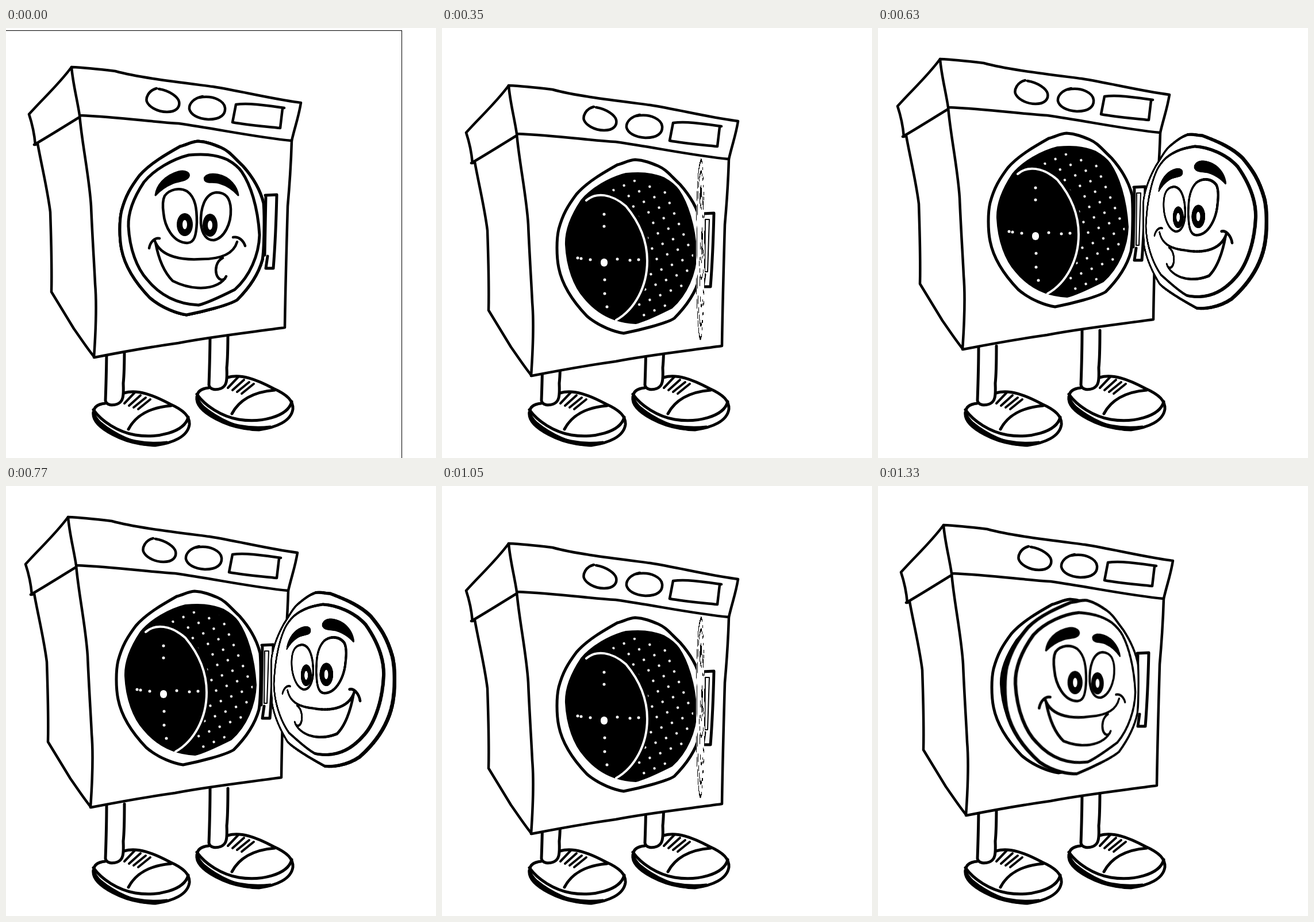
An HTML page without scripts that plays this animation: 748 by 748 pixels, repeating every 1.4 s.

```html
<!DOCTYPE html>
<html lang="en">
<head>
<meta charset="utf-8">
<title>Washing machine</title>
<style>
html, body { margin: 0; width: 100%; height: 100%; overflow: hidden; background: #fff; }
#stage { position: relative; width: 748px; height: 748px; overflow: hidden; animation: swing 1.4s step-end infinite, depth 1.4s step-end infinite; }
#stage svg { position: absolute; left: 0; top: 0; overflow: visible; fill: none; stroke: #000; stroke-width: 5; stroke-linecap: round; stroke-linejoin: round; }
#machine { position: absolute; inset: 0; transform: translate(var(--x), var(--y)); }
#machine svg.door {
  left: 190px; top: 190px; width: 270px; height: 320px; transform-origin: 133px 159px;
  transform: translateX(var(--c)) perspective(350px) rotateY(var(--r));
}
#machine svg.back { transform: translateX(var(--c)) perspective(350px) rotateY(var(--r)) translateZ(var(--z)); }
.hinge { opacity: var(--hinge); stroke-width: 2; }
.border { stroke-width: 1; stroke-linecap: butt; animation: side 1.4s step-end infinite; }
.border.top { animation-name: top; }
.white { fill: #fff; }
.black { fill: #000; }

/* x, y: cabinet shift; c, r: door centre and angle. The second half mirrors the first. */
@keyframes swing {
  0%, to   { --x: 0px;  --y: 0px;   --c: 0px;   --r: 0deg; }
  5%, 95%  { --x: 0px;  --y: 0px;   --c: 31px;  --r: 25deg; }
  10%, 90% { --x: 0px;  --y: 24px;  --c: 68px;  --r: 50deg; }
  15%, 85% { --x: 2px;  --y: 2px;   --c: 87px;  --r: 63deg; }
  20%, 80% { --x: 2px;  --y: 18px;  --c: 108px; --r: 76deg; }
  25%, 75% { --x: 2px;  --y: 32px;  --c: 127px; --r: 87deg; }
  30%, 70% { --x: 2px;  --y: 14px;  --c: 145px; --r: 95deg; }
  35%, 65% { --x: 2px;  --y: -6px;  --c: 162px; --r: 102deg; }
  40%, 60% { --x: -2px; --y: -9px;  --c: 197px; --r: 123deg; }
  45%, 55% { --x: -6px; --y: -14px; --c: 230px; --r: 145deg; }
  50%      { --x: 2px;  --y: -8px;  --c: 273px; --r: 168deg; }
}
@keyframes depth {
  0%, to { --z: 0px; --hinge: 0; }
  5%  { --z: -8px; --hinge: 0; }
  10% { --z: -8px; --hinge: 1; }
  25% { --z: 0px; --hinge: 1; }
  80% { --z: -8px; --hinge: 1; }
  95% { --z: -8px; --hinge: 0; }
}
@keyframes side { 0% { opacity: 1; } 15%, to { opacity: 0; } }
@keyframes top { 0% { opacity: 1; } 5%, to { opacity: 0; } }
</style>
</head>
<body>
<div id="stage">
  <svg width="748" height="748">
    <defs>
      <path id="rim" d="M303 206C315 203 322 198 334 197C350 198 362 203 374 208C388 214 395 224 412 240C428 258 442 280 448 305C450 330 449 385 446 403C440 425 425 450 402 473C388 482 340 494 314 499C300 497 272 488 250 469C226 444 207 415 201 385C197 365 197 335 201 318C208 292 217 277 232 257C250 236 280 219 303 206Z"/>
      <path id="inner" d="M385 229C362 219 340 219 318 221C290 228 258 246 240 268C224 292 212 318 213 345C215 385 228 418 245 437C262 458 290 480 335 482C352 478 376 466 398 455C424 432 440 395 441 360C438 310 425 272 410 250C403 240 394 234 385 229Z"/>
      <pattern id="holes" width="20" height="20" patternUnits="userSpaceOnUse" patternTransform="rotate(-24)">
        <circle cx="9" cy="9" r="2.2" fill="#fff" stroke="none"/>
      </pattern>
      <g id="foot">
        <path class="white" d="M205 635C228 628 255 638 285 654C310 665 320 676 319 690C316 711 290 722 260 726C225 726 187 706 164 687C150 674 146 656 172 653Z"/>
        <path class="black" d="M151 668C162 690 190 711 225 718C245 722 262 722 280 720C255 732 215 724 185 708C162 696 149 682 151 668Z" stroke-width="3"/>
        <path d="M152 664C166 684 195 703 225 708C262 714 310 704 317 677M213 698C225 675 250 660 287 657"/>
        <path d="M206 653L224 634M214 657L234 639M222 660L243 643M230 663L251 646" stroke-width="4"/>
        <path class="white" d="M175 553C175 590 174 620 173 648C175 657 186 657 194 654C204 650 205 640 204 618C206 600 206 580 206 553"/>
      </g>
    </defs>
    <use href="#foot"/>
    <use href="#foot" x="180" y="-27"/>
  </svg>

  <div id="machine">
    <svg width="748" height="748">
      <path class="border top" d="M0 4.5H689"/>
      <path class="border" d="M688.5 4V790"/>
      <g stroke-width="4.5">
        <path class="white" d="M114 68C140 69 165 72 190 75C230 86 290 93 360 102C410 110 460 123 513 130C509 155 503 170 497 196C496 230 494 265 490 310C488 380 486 450 485 521C420 530 350 538 300 548C250 555 200 564 154 573C141 557 130 540 118 523L79 459C80 420 79 380 77 320C72 280 62 240 55 201L51 203C49 180 45 165 40 150C65 122 92 98 114 68Z"/>
        <path d="M114 68C116 95 124 125 128 152C132 200 145 260 148 310C150 360 154 420 155 445C158 480 156 530 153 573M128 152C200 155 250 163 300 166C370 176 440 191 497 196M49 203C75 188 100 172 128 155"/>
        <path d="M262 105C247 109 243 122 245 128C248 136 262 146 280 146C296 146 303 138 301 128C299 120 285 109 266 106M342 119C326 122 318 132 319 141C321 150 333 158 352 159C374 159 382 150 381 139C380 128 362 116 336 121M484 139C455 135 425 130 400 133L394 164C420 169 450 171 477 174L481 140"/>
      </g>
      <path d="M451 291L471 290C470 335 468 380 465 418L452 418L455 397M452 292L450 395"/>
      <path class="hinge" d="M456 301H463L460 392H455Z"/>
      <use href="#rim" class="white"/>
      <use href="#inner" class="black" stroke-width="2"/>
      <path fill="url(#holes)" stroke="none" d="M290 248C325 225 370 225 395 252C430 300 440 340 433 385C420 430 385 465 340 474L326 464C375 410 375 310 308 260Z"/>
      <g stroke="#fff">
        <path d="M249 268C266 253 293 256 318 278C343 308 355 338 355 373C355 418 333 458 301 476" stroke-width="4"/>
        <path d="M280 292V292M280 313V313M281 406V406M281 430V430M285 453V453M234 368V368M240 369V369M256 371V371M303 370V370M325 372V372M340 371V371"/>
        <path d="M280 375V377" stroke-width="12"/>
      </g>
    </svg>

    <svg class="door back" viewBox="190 190 270 320"><use href="#rim" fill="#444"/></svg>

    <svg class="door" viewBox="190 190 270 320">
      <use href="#rim" class="white"/>
      <use href="#inner"/>
      <g class="black" stroke-width="3">
        <path d="M260 291C262 275 275 257 300 250C312 247 320 252 318 258C315 266 300 266 290 270C278 275 268 282 260 291Z"/>
        <path d="M404 291C402 277 390 259 368 255C352 252 343 258 346 265C349 270 362 267 372 270C386 274 396 282 404 291Z"/>
      </g>
      <path d="M276 292C285 280 302 277 315 284C330 295 332 315 332 338C331 360 328 374 315 374C290 373 276 345 274 322C272 308 273 298 276 292ZM366 286C345 288 338 315 339 340C341 360 350 370 362 369C380 365 392 340 391 315C390 295 382 286 366 286Z" stroke-width="4.5"/>
      <g stroke="none">
        <ellipse class="black" cx="311" cy="342" rx="14" ry="20"/>
        <ellipse class="black" cx="355" cy="343" rx="13" ry="20"/>
        <ellipse class="white" cx="311" cy="342" rx="4" ry="8"/>
        <ellipse class="white" cx="355" cy="343" rx="4" ry="8"/>
      </g>
      <path d="M258 368C268 400 310 404 340 402C375 402 396 393 402 372M260 373C265 400 275 425 290 440C320 455 350 455 368 446C376 442 380 438 383 432M377 400C365 406 364 420 366 428C369 438 376 440 381 436M249 383C251 372 259 364 267 366M395 364C405 362 413 370 416 379" stroke-width="4.5"/>
    </svg>
  </div>
</div>
</body>
</html>
```
